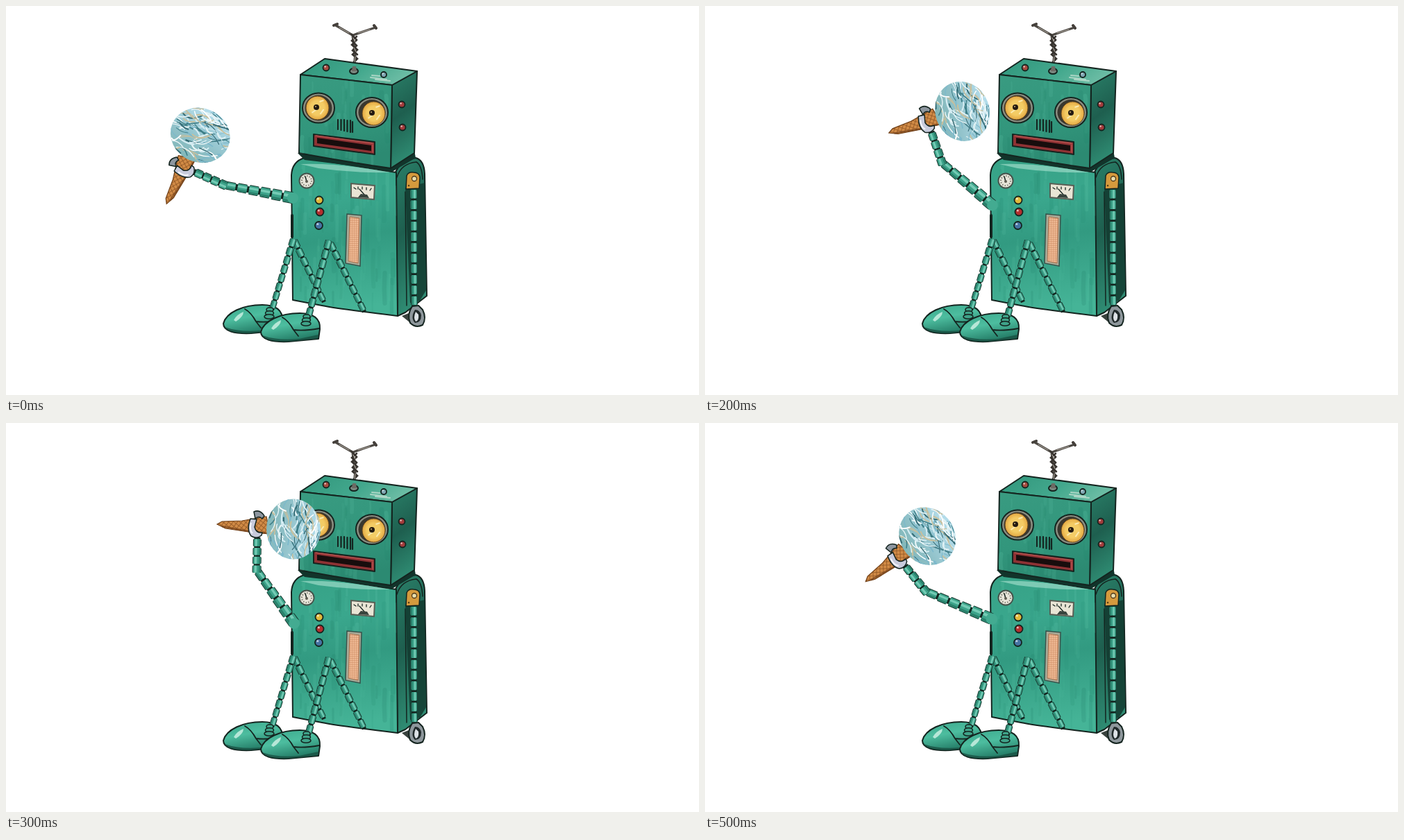
Animation of 998x561 px, one loop 0.6 s. Source, as an HTML page:

```html
<!DOCTYPE html>
<html lang="en">
<head>
<meta charset="utf-8">
<title>Robot with ice cream</title>
<style>
html, body { margin: 0; width: 100%; height: 100%; overflow: hidden; background: #fff; }
svg { display: block; width: 100%; height: 100%; }
.ink { stroke: #14241f; stroke-width: 2; stroke-linejoin: round; stroke-linecap: round; }
.line { fill: none; stroke: #14241f; stroke-linecap: round; }
</style>
</head>
<body>
<svg viewBox="0 0 998 561" xmlns="http://www.w3.org/2000/svg">
  <defs>
    <linearGradient id="face" x2=".25" y2="1">
      <stop offset="0" stop-color="#399b81"/><stop offset=".6" stop-color="#32967c"/><stop offset="1" stop-color="#2c8a72"/>
    </linearGradient>
    <linearGradient id="top" x2="1" y2=".3">
      <stop offset="0" stop-color="#2f957b"/><stop offset=".6" stop-color="#43a88d"/><stop offset="1" stop-color="#6bbca4"/>
    </linearGradient>
    <linearGradient id="side" x2=".2" y2="1">
      <stop offset="0" stop-color="#2a8069"/><stop offset=".5" stop-color="#1e5f4f"/><stop offset="1" stop-color="#2f8c73"/>
    </linearGradient>
    <linearGradient id="front" x2=".1" y2="1">
      <stop offset="0" stop-color="#36a286"/><stop offset=".3" stop-color="#3aa78d"/>
      <stop offset=".55" stop-color="#329a81"/><stop offset="1" stop-color="#45b497"/>
    </linearGradient>
    <linearGradient id="shoe" x2=".4" y2="1">
      <stop offset="0" stop-color="#3aa78b"/><stop offset=".5" stop-color="#4dbd9f"/><stop offset="1" stop-color="#257e68"/>
    </linearGradient>
    <radialGradient id="iris"><stop offset="0" stop-color="#f2cf6c"/><stop offset=".6" stop-color="#f4cb63"/><stop offset="1" stop-color="#e3a843"/></radialGradient>
    <linearGradient id="scoop" x2="1" y2=".2">
      <stop offset="0" stop-color="#7fb5b5"/><stop offset=".4" stop-color="#8dbfc6"/><stop offset="1" stop-color="#b3dcea"/>
    </linearGradient>
    <pattern id="waffle" width="5" height="5" patternUnits="userSpaceOnUse" patternTransform="rotate(38)">
      <rect width="5" height="5" fill="#d18b46"/><path d="M0 0H5M0 0V5" stroke="#8f5422" stroke-width="1.6"/>
    </pattern>
    <pattern id="mesh" width="3" height="3" patternUnits="userSpaceOnUse">
      <rect width="3" height="3" fill="#efb994"/><path d="M0 0H3M0 0V3" stroke="#c98760" stroke-width=".9"/>
    </pattern>
    <clipPath id="faceClip"><path d="M424 99L556 114L554 234L422 212Z"/></clipPath>
    <clipPath id="frontClip"><path d="M413 424L411 244Q412 224 430 219L562 240L564 447Z"/></clipPath>
    <clipPath id="ballClip"><ellipse cx="53" cy="-59" rx="39" ry="43.5"/></clipPath>
  </defs>

  <!-- antenna -->
  <path class="line" d="M501 92L503 70L499 42L475 28M500 42L514 37L532 31" stroke-width="3.4" style="stroke:#4c4843"/>
  <path class="line" d="M498 41L505 49L498 56L506 63L499 70L506 76L500 82M505 44L498 50L505 57L499 64L506 70" stroke-width="2.6" style="stroke:#37332f"/>
  <path class="line" d="M500 46L503 52M501 60L504 66M503 73L502 84M480 31L494 39M507 39L524 34" stroke-width="1" style="stroke:#b9b2a8"/>
  <path class="line" d="M472 28L477 26M530 28L533 32" stroke-width="4" style="stroke:#45403b"/>

  <!-- body -->
  <path class="ink" d="M560 242Q566 224 590 219Q602 222 603 242L606 418L575 442L564 447Z" fill="url(#side)"/>
  <path class="ink" d="M413 424L411 244Q412 224 430 219L562 240L564 447Q480 437 455 432Z" fill="url(#front)"/>
  <g id="frontStrokes" clip-path="url(#frontClip)"></g>
  <path d="M424 228Q480 226 553 240Q500 241 450 234Z" fill="#a4dfcc" opacity=".65"/>
  <path d="M420 212L430 222Q500 230 556 239L590 219L588 208L554 231Z" fill="#12342b"/>
  <path class="line" d="M563 247Q569 227 591 225Q599 230 600 250M575 268L577 432" stroke-width="1.5"/>
  <path d="M575 262L603 255L605 410L596 425L582 428Z" fill="#123a30" opacity=".85"/>
  <path class="line" d="M412 302L412 333" stroke-width="4"/>

  <!-- head -->
  <path class="ink" d="M556 114L592 94L588 212L554 234Z" fill="url(#side)"/>
  <path class="ink" d="M424 99L459 76L592 94L556 114Z" fill="url(#top)"/>
  <path class="ink" d="M424 99L556 114L554 234Q480 223 422 212Z" fill="url(#face)"/>
  <g id="faceStrokes" clip-path="url(#faceClip)"></g>
  <path class="line" d="M525 103L548 106M532 106L553 108M527 100L538 101" stroke-width="2" style="stroke:#d0e6d9" opacity=".7"/>
  <g id="bulbs"></g>
  <ellipse class="ink" cx="501" cy="94" rx="6" ry="4" fill="#7c8a82"/>
  <path d="M498 94L499 87H504L505 94Z" fill="#6d6a64"/>
  <g id="eyes"></g>
  <path class="line" d="M478 164V178M482.500 164V179M487 164V180M491.500 165V181M496 165V182M499 167V182" stroke-width="2.200"/>
  <path class="ink" d="M443 185L531 196L531 214L443 202Z" fill="#8f3234"/>
  <path d="M448 190L526 201V209L448 198Z" fill="#180d0d"/>
  <path class="line" d="M446 187L528 198M528 200V211" stroke-width="1.300" style="stroke:#b85450"/>

  <!-- panel -->
  <circle cx="433" cy="252" r="10.500" fill="#e6e4d8" stroke="#46544c" stroke-width="2"/>
  <circle cx="433" cy="252" r="7" fill="none" stroke="#77776c" stroke-width="2" stroke-dasharray="1.400 2.260"/>
  <path class="line" d="M433 253L431 246" stroke-width="1.500"/><circle cx="433" cy="253" r="2" fill="#5d5b50"/>
  <g id="buttons"></g>
  <path d="M497 256L531 259L530 279L497 276Z" fill="#e9e5d5" stroke="#595f55" stroke-width="2"/>
  <path class="line" d="M501 262L504 264M507 261V264M513 261V264M519 262V265M526 263L524 266M509 264L516 272" stroke-width="1.300"/>
  <path d="M507 276L511 271L520 272L523 277Z" fill="#38443d"/>
  <path d="M491 300L512 302L510 375L489 371Z" fill="#a9aa97" stroke="#36524a" stroke-width="1.500"/>
  <path d="M495 304L509 306L507 371L493 368Z" fill="url(#mesh)" stroke="#a3704f"/>

  <!-- hanging arm -->
  <path class="ink" d="M576 264L577 245Q579 239 587 240Q595 240 596 247L595 263Z" fill="#d59a3d" style="stroke-width:1.500"/>
  <circle cx="588" cy="249" r="3.500" fill="#eadfae" stroke="#4b3718" stroke-width="1.300"/>
  <circle cx="580" cy="259" r="1.300" fill="#5b3f16"/>
  <g id="restArm"></g>
  <path d="M570 447L580 443L586 460Z" fill="#39423e"/>
  <path class="ink" d="M585 433Q577 445 582 457Q590 465 600 460Q606 450 600 438L594 432Z" fill="#8e979c"/>
  <path d="M589 438Q582 450 589 457Q598 457 598 446Q596 438 589 438Z" fill="#20292a"/>
  <path d="M590 441Q586 450 590 455Q595 454 594 445Z" fill="#dde2e6"/>

  <!-- legs -->
  <g id="legs"></g>
  <g id="feet"></g>

  <g id="upper"></g>
  <g id="fore">
    <g id="foreLimb"></g>
    <path d="M-57 -66L-50 -70L-21 -71L14 -77L19 -52L-12 -55L-45 -60Z" fill="url(#waffle)" stroke="#704018" stroke-width="1.200"/>
    <path d="M-50 -63L-12 -56L16 -53" fill="none" stroke="#71401b" stroke-width="2.500" opacity=".65"/>
    <path class="ink" d="M-4 -84Q5 -88 11 -78L8 -74Q3 -79 -2 -74Z" fill="#8d969f" style="stroke-width:1.500"/>
    <path class="ink" d="M-9 -74Q-15 -58 -8 -49Q0 -44 7 -50L8 -54Q-1 -53 -3 -62L0 -73Z" fill="#c8cbdc" style="stroke-width:1.500"/>
    <path d="M-8 -68Q-11 -58 -6 -53" fill="none" stroke="#f4f5fa" stroke-width="2"/>
    <ellipse cx="53" cy="-59" rx="39" ry="43.500" fill="url(#scoop)"/>
    <g id="threads" clip-path="url(#ballClip)" fill="none" stroke-linecap="round"></g>
  </g>
</svg>
<script>
const STEP = 100;
const SHOULDERS = [[409, 276], [409, 281], [411, 285], [413, 286]];
const ELBOWS = [[314, 258], [317.5, 242.5], [341, 225.5], [361, 212]];
const ANGLES = [-67.5, -40, -20, 0];
const ORDER = [0, 1, 2, 3, 2, 1];
const ARM = 94;

const el = id => document.getElementById(id);
const put = (id, parts) => { el(id).innerHTML = [].concat(parts).join(''); };
const range = n => Array.from({ length: n }, (_, i) => i);

function randomizer(seed) {
  return () => (seed = (seed * 16807) % 2147483647) / 2147483647;
}

// Tube of n short cylinders tapering from width w1 to w2.
function limb(x1, y1, x2, y2, w1, w2, n) {
  const len = Math.hypot(x2 - x1, y2 - y1);
  const turn = Math.atan2(y2 - y1, x2 - x1) * 180 / Math.PI;
  const pitch = len / n;
  const body = range(n).map(i => {
    const w = w1 + (w2 - w1) * i / Math.max(1, n - 1);
    const x = i * pitch, l = pitch * 0.82;
    const bar = (y, h, fill) => `<rect x="${x}" y="${y}" width="${l}" height="${h}" rx="1.5" fill="${fill}"/>`;
    return bar(-w / 2 - 1, w + 2, '#17372e') + bar(-w / 2, w, '#3da38a') +
      bar(-w * 0.3, w * 0.28, '#75cbb5') + bar(w * 0.24, w * 0.24, '#2a806b');
  }).join('');
  const core = `<path d="M0 0H${len}" stroke="#14241f" stroke-width="${Math.min(w1, w2) * 0.9}"/>`;
  return `<g transform="translate(${x1} ${y1}) rotate(${turn})">${core}${body}</g>`;
}

function brush(id, seed, n, x, y, w, h, size) {
  const rnd = randomizer(seed);
  put(id, range(n).map(() => {
    const px = x + rnd() * w, py = y + rnd() * h, l = size * (0.4 + rnd());
    const tone = rnd() < 0.5 ? '#1f7d66' : '#62c6aa';
    return `<path d="M${px} ${py}q${rnd() * 4 - 2} ${l / 2} 0 ${l}" fill="none" stroke="${tone}"
      stroke-width="${2 + rnd() * 5}" stroke-linecap="round" opacity="${0.06 + rnd() * 0.14}"/>`;
  }));
}

function threads() {
  const rnd = randomizer(77);
  const tones = ['#ffffff', '#3f7f88', '#e8f5f6', '#7db9cc', '#c7bf9d', '#316771', '#d6edf3'];
  put('threads', range(125).map(i => {
    const x = 12 + rnd() * 80, y = -106 + rnd() * 84;
    const lean = (rnd() - 0.5) * 22, l = 10 + rnd() * 20, bend = (rnd() - 0.5) * 18;
    return `<path d="M${x} ${y}q${bend} ${l / 2} ${lean} ${l}" stroke="${tones[i % 7]}" stroke-width="${0.9 + rnd() * 1.3}"/>`;
  }));
}

function bulb(x, y, r, fill) {
  return `<circle class="ink" cx="${x}" cy="${y}" r="${r}" fill="${fill}" style="stroke-width:1.8"/>
    <circle cx="${x - r * 0.3}" cy="${y - r * 0.35}" r="${r * 0.28}" fill="#fff" opacity=".65"/>`;
}

function eye(x, y, ix, iy, px, py) {
  return `<ellipse class="ink" cx="${x}" cy="${y}" rx="23" ry="21.5" fill="#8b8d80"/>
    <ellipse cx="${x}" cy="${y}" rx="19.5" ry="18.5" fill="#39372f"/>
    <ellipse cx="${ix}" cy="${iy}" rx="16.5" ry="17" fill="url(#iris)" stroke="#64461c"/>
    <path d="M${ix - 8} ${iy + 7}l7 -5M${ix + 3} ${iy - 9}l6 -2M${ix + 4} ${iy + 9}l5 -7" stroke="#fbeab0" stroke-width="2"/>
    <circle cx="${px}" cy="${py}" r="4" fill="#241a10"/><circle cx="${px - 1}" cy="${py - 1}" r="1" fill="#c9b173"/>`;
}

function foot(x, y) {
  return `<g transform="translate(${x} ${y})">
    <path class="ink" d="M0 27C4 11 28 0 56 0C76 0 86 8 85 23L83 37L40 41C16 42 0 38 0 27Z" fill="url(#shoe)"/>
    <path d="M2 32Q24 40 55 37L83 31L82 37L40 41Q8 42 2 32Z" fill="#174c3f" opacity=".75"/>
    <path class="line" d="M31 6Q40 11 47 24Q62 26 84 22M47 24L54 33" stroke-width="1.8"/>
    <path d="M15 22Q19 14 29 10Q29 17 18 24Z" fill="#c9efe2" opacity=".85"/></g>`;
}

function ankle(x, y) {
  return [0, 5, 10].map(d =>
    `<ellipse class="ink" cx="${x - d * 0.1}" cy="${y + d}" rx="${5 + d * 0.2}" ry="3.2" fill="#3fa389" style="stroke-width:1.5"/>`).join('');
}

function build() {
  brush('faceStrokes', 11, 45, 424, 95, 130, 120, 24);
  brush('frontStrokes', 29, 75, 412, 225, 150, 200, 38);
  put('bulbs', [bulb(461, 89, 4.5, '#a64b40'), bulb(544, 99, 4, '#7fa6b2'),
    bulb(570, 142, 4.5, '#a33c3c'), bulb(571, 175, 4.5, '#a33c3c')]);
  put('eyes', [eye(450, 147, 448.5, 147, 447, 146), eye(527, 153.5, 529.5, 155, 527, 154)]);
  put('buttons', [bulb(451, 280, 5.5, '#e2b93b'), bulb(452, 297, 5.5, '#b52f2f'), bulb(450.5, 316.5, 5.5, '#4673a3')]);
  put('restArm', limb(587, 265, 588, 434, 9, 8, 11));
  put('legs', [limb(415, 338, 458, 427, 8, 7, 7), limb(467, 342, 516, 441, 8, 7, 8)]);
  put('feet', [foot(313, 431), limb(414, 336, 383, 438, 8, 7, 8), ankle(380, 438),
    foot(367, 443), limb(465, 338, 435, 450, 8, 8, 8), ankle(433, 448)]);
  put('upper', limb(-4, 0, ARM, 0, 15, 10, 6) +
    '<ellipse cx="-4" cy="0" rx="8" ry="8" fill="#43ab91"/>');
  put('foreLimb', limb(0, 4, 1, -47, 11, 10, 4));
  threads();
}

function pose(k) {
  const [sx, sy] = SHOULDERS[k], [ex, ey] = ELBOWS[k];
  const dx = ex - sx, dy = ey - sy;
  const turn = Math.atan2(dy, dx) * 180 / Math.PI;
  el('upper').setAttribute('transform',
    `translate(${sx} ${sy}) rotate(${turn}) scale(${Math.hypot(dx, dy) / ARM} -1)`);
  el('fore').setAttribute('transform', `translate(${ex} ${ey}) rotate(${ANGLES[k]})`);
}

const start = performance.now();
function tick() {
  const t = Math.max(0, performance.now() - start);
  pose(ORDER[Math.floor(t / STEP) % ORDER.length]);
  requestAnimationFrame(tick);
}

build();
tick();
</script>
</body>
</html>
```
